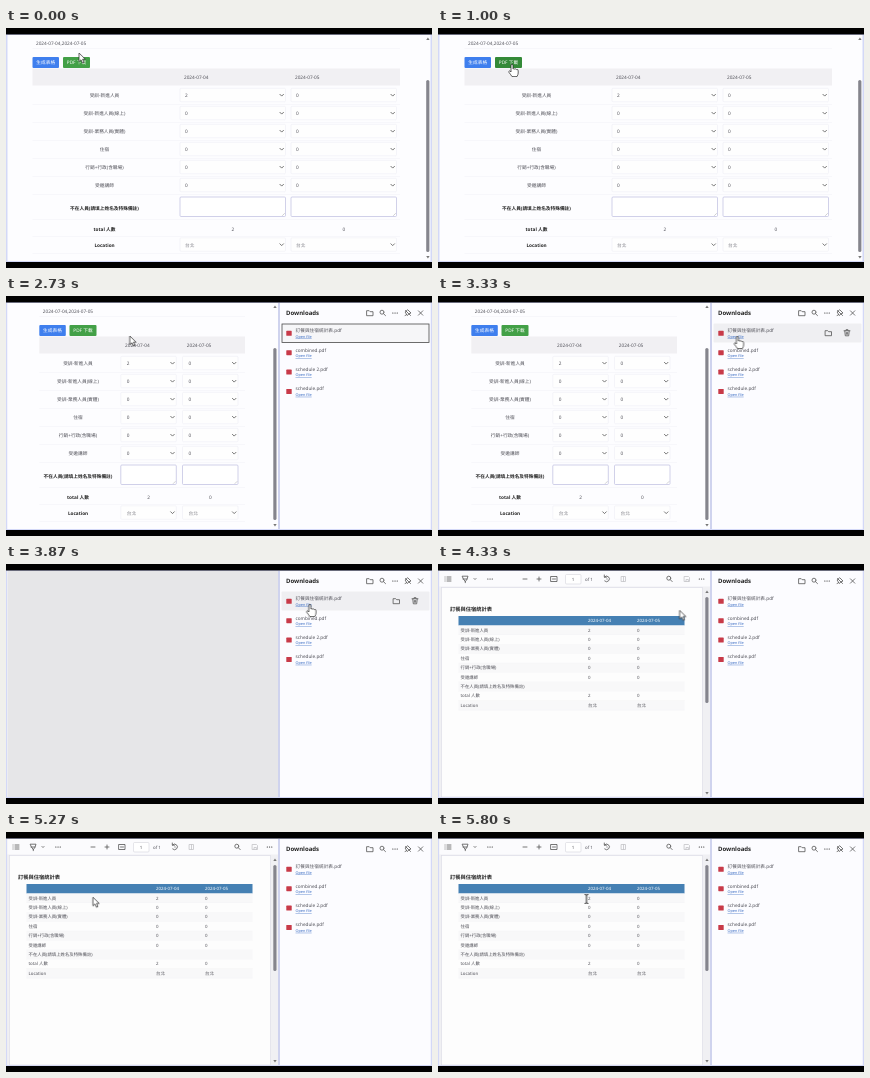
These frames come from a looping animation (426 by 240 pixels, 5870 ms). An HTML page:

```html
<!DOCTYPE html>
<html lang="en">
<head>
<meta charset="utf-8">
<title>Form to PDF download</title>
<style>
html, body { margin: 0; width: 100%; height: 100%; overflow: hidden; background: #000; }
svg { display: block; width: 100%; height: 100%; }
text { font: 4.7px "Noto Sans", "Noto Sans CJK TC", "Noto Sans CJK", sans-serif; fill: #505058; text-rendering: geometricPrecision; }
.mid { text-anchor: middle; }
.bold { font-weight: 700; fill: #222; }
.white { fill: #fff; }
.soft { fill: #85858c; }
.title { font-size: 6px; font-weight: 600; fill: #222; }
.link { font-size: 3.8px; fill: #3d6fc4; text-decoration: underline; }
.pdf text { font-size: 4.4px; }
.pdf .head { font-size: 5.25px; font-weight: 700; fill: #222; }
.line { fill: none; stroke: #555; stroke-width: .8; stroke-linecap: round; stroke-linejoin: round; }
.dim { stroke: #c4c4c8; }
.dots { stroke: #333; stroke-width: 1.2; }

.step { animation: 5870ms step-end infinite; }
#narrow, #panel { animation-name: panel; }
#loading { animation-name: loading; }
#viewer { animation-name: viewer; }
#focus { animation-name: focus; }
#hover { animation-name: hover; }
#arrow { animation-name: arrow; }
#hand { animation-name: hand; }
#beam { animation-name: beam; }
#wide .save { animation: press 5870ms step-end infinite; }
#cursor { animation: travel 5870ms linear infinite; }

@keyframes panel { 0% { opacity: 0 } 37.48%, 100% { opacity: 1 } }
@keyframes loading { 0% { opacity: 0 } 62.52%, 100% { opacity: 1 } }
@keyframes viewer { 0% { opacity: 0 } 71.55%, 100% { opacity: 1 } }
@keyframes focus { 0% { opacity: 1 } 56%, 100% { opacity: 0 } }
@keyframes hover { 0% { opacity: 0 } 56% { opacity: 1 } 72.5%, 100% { opacity: 0 } }
@keyframes press { 0% { fill: #43a047 } 2%, 100% { fill: #348a38 } }
@keyframes arrow { 0% { opacity: 1 } 2% { opacity: 0 } 41% { opacity: 1 } 56% { opacity: 0 } 72.5% { opacity: 1 } 90%, 100% { opacity: 0 } }
@keyframes hand { 0% { opacity: 0 } 2% { opacity: 1 } 41% { opacity: 0 } 56% { opacity: 1 } 72.5%, 100% { opacity: 0 } }
@keyframes beam { 0% { opacity: 0 } 90%, 100% { opacity: 1 } }
@keyframes travel {
  0% { transform: translate(73px, 25px) }
  5%, 22% { transform: translate(74px, 36px) }
  30.66%, 38% { transform: translate(69px, 33px) }
  46.51% { transform: translate(123.5px, 40px) }
  57%, 71% { transform: translate(303.8px, 40px) }
  81.77%, 87% { transform: translate(63px, 64.5px) }
  97%, 100% { transform: translate(148.5px, 67px) }
}
</style>
</head>
<body>
<svg viewBox="0 0 426 240">
  <rect width="426" height="240"/>
  <rect y="6.5" width="426" height="227.5" fill="#d3d8f7"/>
  <g id="wide"></g>
  <g id="narrow" class="step"></g>
  <rect id="loading" class="step" x="1.5" y="7" width="270.5" height="226" fill="#e6e6e8"/>
  <g id="viewer" class="step pdf"></g>
  <g id="panel" class="step"></g>
  <g id="cursor" stroke="#222" stroke-width=".7" stroke-linejoin="round" fill="#fff">
    <path id="arrow" class="step" d="M0 0V8.6L2 6.8L3.5 10L5 9.3L3.6 6.2H6.3Z"/>
    <path id="hand" class="step" d="M-1 1Q0-.6 1 1V5Q2 4 2.8 5.2Q3.9 4.3 4.6 5.6Q6.2 5 6.2 6.8V9Q6.2 10.5 5 12.6H0Q-1 11-3 8.4Q-3.6 7.2-2.6 6.9Q-1.8 6.8-1 8Z"/>
    <path id="beam" class="step" fill="none" stroke-width="1" d="M-1.8-4.5Q0-4.5 0-3.5Q0-4.5 1.8-4.5M0-3.5V3.5M-1.8 4.5Q0 4.5 0 3.5Q0 4.5 1.8 4.5"/>
  </g>
</svg>
<script>
const LABELS = ['受訓-新進人員', '受訓-新進人員(線上)', '受訓-業務人員(實體)', '住宿', '行銷+行政(含職場)', '受邀講師'];
const NOTE = '不在人員(請填上姓名及特殊備註)';
const DATES = ['2024-07-04', '2024-07-05'];
const TITLE = '訂餐與住宿統計表';

const text = (x, y, s, cls = '') => `<text x="${x}" y="${y}" class="${cls}">${s}</text>`;
const rect = (x, y, w, h, fill, more = '') => `<rect x="${x}" y="${y}" width="${w}" height="${h}" fill="${fill}" ${more}/>`;
const line = (d, cls = '') => `<path class="line ${cls}" d="${d}"/>`;
const dots = (x, y) => line(`M${x - 2.2} ${y}h.1M${x} ${y}h.1M${x + 2.2} ${y}h.1`, 'dots');
const put = (id, parts) => document.getElementById(id).innerHTML = parts.flat(9).join('');
const count = (row, col) => row === 0 && col === 0 ? 2 : 0;

function scrollbar(x, top, from, to) {
  const tri = (y, dy) => `<path d="M${x} ${y}h3.4l-1.7 ${dy}z" fill="#777"/>`;
  return [tri(top + 2, -2.6), rect(x, from, 3.2, to - from, '#85858d', 'rx="1.6"'), tri(228, 2.6)];
}

function select(x, y, w, pad, value, cls) {
  return [
    rect(x, y - 7, w, 13.5, '#fefefe', 'stroke="#efeff5" stroke-width=".6" rx="1"'),
    text(x + pad, y + 1.8, value, cls),
    line(`M${x + w - 5.6} ${y - 1}l1.8 1.8l1.8-1.8`)
  ];
}

function form({ pageW, left, right, button2, cx, cols, w, pad, headPad, barX }) {
  const rule = y => rect(left, y, right - left, .5, '#f1f1f6');
  return [
    rect(1.5, 7, pageW, 226, '#fdfdff'),
    text(left + 3.5, 17.3, DATES.join()),
    rule(20),
    rect(left, 29, 26.5, 11, '#3f7fee', 'rx="1"'),
    text(left + 13.2, 36.3, '生成表格', 'mid white'),
    rect(button2, 29, 27, 11, '#43a047', 'rx="1" class="save"'),
    text(button2 + 13.5, 36.3, 'PDF 下載', 'mid white'),
    rect(left, 40.5, right - left, 17, '#f1f0f3'),
    DATES.map((d, c) => text(cols[c] + headPad, 50.8, d)),
    LABELS.map((label, r) => {
      const y = 67.3 + 18 * r;
      return [
        rule(y + 8.8),
        text(cx, y + 1.8, label, 'mid'),
        cols.map((x, c) => select(x, y, w, pad, count(r, c)))
      ];
    }),
    text(cx, 181.8, NOTE, 'mid bold'),
    text(cx, 202.6, 'total 人數', 'mid bold'),
    text(cx, 218.6, 'Location', 'mid bold'),
    [191.5, 208, 225].map(rule),
    cols.map((x, c) => [
      rect(x, 169, w, 19.5, '#fff', 'stroke="#bdbde0" stroke-width=".7" rx="1"'),
      line(`M${x + w - 3} 187.5l2-2`, 'dim'),
      text(x + w / 2, 202.6, count(0, c), 'mid'),
      select(x, 216.8, w, pad, '台北', 'soft')
    ]),
    scrollbar(barX, 10, 52, 224)
  ];
}

function pdfViewer() {
  const rows = [...LABELS, NOTE, 'total 人數', 'Location'];
  const cells = [150, 199];
  const value = (r, c) => r < 6 ? count(r, c) : r === 6 ? '' : r === 7 ? count(0, c) : '台北';
  return [
    rect(1.5, 7, 270.5, 226, '#f0f0f3'),
    rect(1.5, 7, 270.5, 15.5, '#fbfbfd'),
    rect(3.5, 23.5, 261, 209.5, '#fdfdfd', 'stroke="#d9d9e4" stroke-width=".6"'),
    line('M7 13h.1M9 13h4M7 15h.1M9 15h4M7 17h.1M9 17h4'),
    line('M24.5 12.2h5.5l-1 3l-1.7 2.5l-1.7-2.5zM25 15h4M27.3 17.7v1M36 14.5l1 1l1-1'),
    dots(52, 15),
    line('M85 15h4M99 15h4M101 13v4M113 12.5h6v5h-6zM114.5 15h3'),
    rect(127.5, 10.5, 15.5, 9.5, '#fff', 'stroke="#d6d6dc" stroke-width=".6" rx="1"'),
    text(135, 16.8, '1', 'mid'),
    text(147, 16.8, 'of 1'),
    line('M166.5 13a2.8 2.8 0 1 1 .2 4M166.3 11v2.2h2.2M169 14.8v.4'),
    line('M183.5 12.5h4v5h-4zM185.5 12.5v5', 'dim'),
    line('M232.8 14.2a2 2 0 1 1-4 0a2 2 0 1 1 4 0M232.4 15.8l1.8 1.8'),
    line('M246.5 12.5h4l1 1v4h-5zM248 17.5v-2h2.4v2', 'dim'),
    dots(263.5, 15),
    text(12, 47.2, TITLE, 'head'),
    rect(20.5, 52, 226, 9.5, '#4580b3'),
    DATES.map((d, c) => text(cells[c], 58.3, d, 'white')),
    rows.map((label, r) => {
      const y = 66.2 + 9.4 * r;
      return [
        rect(20.5, y - 4.7, 226, 9.4, r % 2 ? '#fdfdfd' : '#f8f8f9'),
        rect(20.5, y + 4.5, 226, .4, '#ededf0'),
        text(22.5, y + 1.3, label),
        cells.map((x, c) => text(x, y + 1.3, value(r, c)))
      ];
    }),
    scrollbar(267.3, 27, 33, 139)
  ];
}

function downloads() {
  const files = [TITLE, 'combined', 'schedule 2', 'schedule'];
  const folder = (x, y) => line(`M${x - 3} ${y - 2.3}h2.2l1 1h2.8v4h-6z`);
  return [
    rect(272, 7, 2, 226, '#cfd3ee'),
    rect(274, 7, 150.5, 226, '#fcfcff'),
    text(280, 19.4, 'Downloads', 'title'),
    folder(364, 17),
    line('M378 16.2a2 2 0 1 1-4 0a2 2 0 1 1 4 0M377.6 17.8l1.9 1.8'),
    dots(389, 17),
    line('M399.5 14.5l5 5M402 14l3 3l-2 .8l-1.7 1.8l-2-3.3zM400.4 18.4l-1.4 1.4'),
    line('M412.4 14.8l4.4 4.4M416.8 14.8l-4.4 4.4'),
    '<g id="focus" class="step">',
    rect(276, 28, 147, 18.5, '#f6f6f8', 'stroke="#4a4a4a" stroke-width=".8"'),
    '</g><g id="hover" class="step">',
    rect(275.5, 27.5, 148, 19, '#efeff2', 'rx="1"'),
    folder(390.5, 37),
    line('M406 34.8h6M408 34.6v-.9h2v.9M406.8 35l.5 4.8h3.4l.5-4.8M408.4 36.5v1.8M409.6 36.5v1.8'),
    '</g>',
    files.map((name, i) => {
      const y = 37 + 19.4 * i;
      return [
        rect(280.3, y - 2.2, 5.4, 5, '#c83a48', 'rx=".6"'),
        text(289.5, y - .8, name + '.pdf'),
        text(289.5, y + 4.6, 'Open file', 'link')
      ];
    })
  ];
}

put('wide', form({
  pageW: 423, left: 26.5, right: 394, button2: 57, cx: 98.5,
  cols: [174, 285], w: 105.5, pad: 5, headPad: 4, barX: 420.2
}));
put('narrow', form({
  pageW: 270.5, left: 33.3, right: 239, button2: 63.5, cx: 72,
  cols: [114.8, 176.5], w: 55.5, pad: 6, headPad: 4.3, barX: 267.3
}));
put('viewer', pdfViewer());
put('panel', downloads());
</script>
</body>
</html>
```
